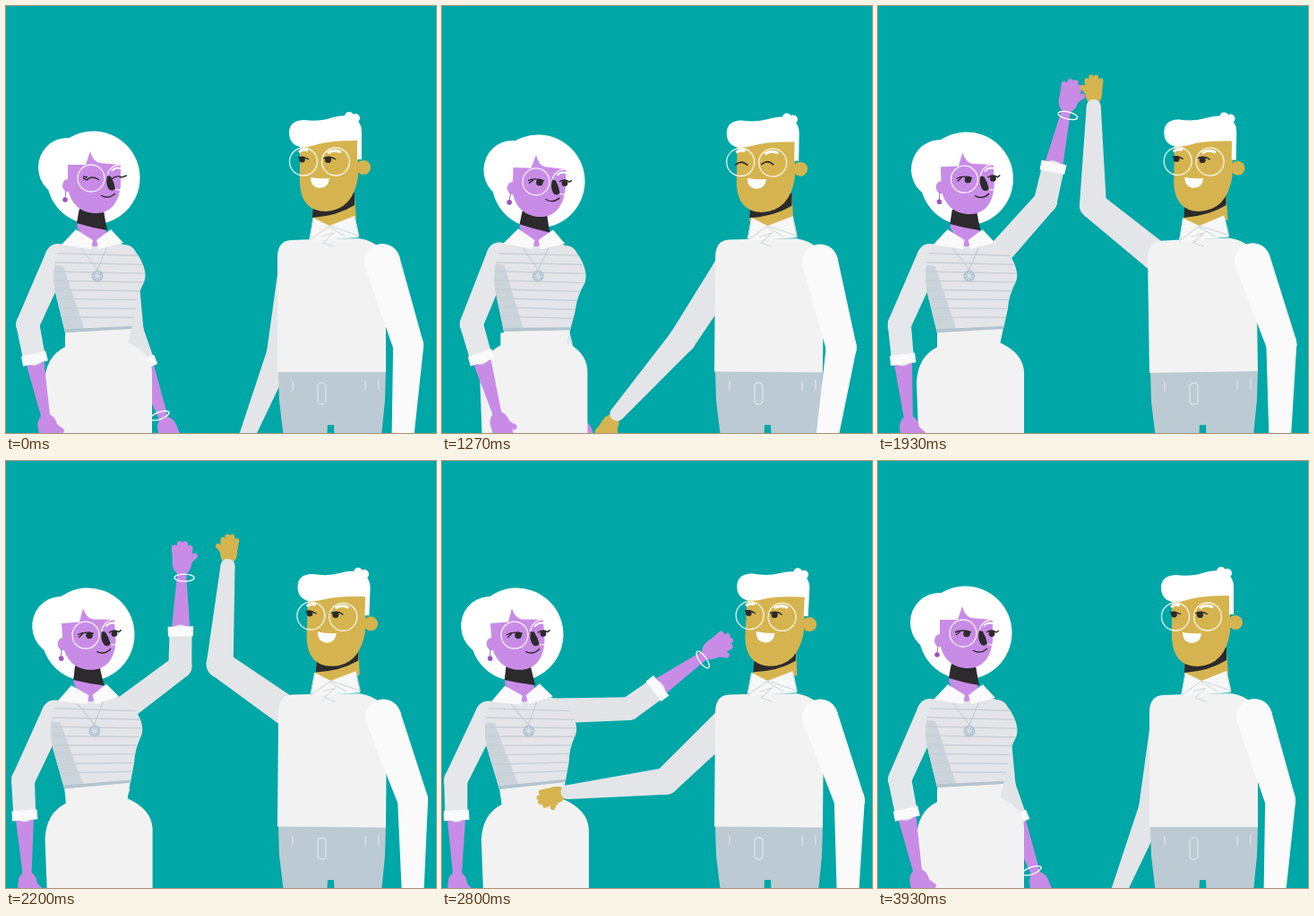
Write an HTML page with a canvas that moves like this. It is 480 px wide and 476 px high and loops after 3990 ms.

```html
<!DOCTYPE html>
<html lang="en">
<head>
<meta charset="utf-8">
<title>High five</title>
<style>
html, body { margin: 0; width: 100%; height: 100%; overflow: hidden; background: #00a7a7; }
canvas { display: block; }
</style>
</head>
<body>
<canvas id="stage" width="480" height="476"></canvas>
<script>
const ctx = document.getElementById('stage').getContext('2d');
const LOOP = 3990, STEP = 66.5, RAD = Math.PI / 180;
const TEAL = '#00a7a7', PURPLE = '#c88ce6', GOLD = '#d5b44f', WHITE = '#fff',
  DARK = '#2c2a2c', SHIRT = '#f2f2f2', SLEEVE = '#e4e5e8', STEEL = '#bccad3';

// time, head x, y, turn, torso x, turn, left upper arm, forearm, right upper arm, forearm, bend of the raised hand
const restW = [0, 0, 0, 0, 0, 114, 79, 84, 70, 0];
const woman = [
  [0, ...restW],
  [760, ...restW],
  [1265, 10, 4, 2, 3, 2, 112, 74, 96, 76, 0],
  [1596, -33, 6, -8, -4, -9, 115.6, 83, -44, -102, -13],
  [1870, 2, 1, -2, 0, 0, 114, 84, -49, -76, 0],
  [2195, -6, 2, -4, -1, -2, 115, 87.5, -37, -89, 0],
  [2795, -14, 2, -4, -2, -3, 116, 89, -1.5, -35, 0],
  [3350, ...restW],
  [LOOP, ...restW]
];
const restM = [0, 0, 0, 0, 0, 99, 112, 72.7, 93.5, 0];
const man = [
  [0, ...restM],
  [760, ...restM],
  [1265, 1, 1, 1, 1, .5, 123, 131.5, 76, 99, -10],
  [1596, 46, 1, 15, 4, 8.5, 234, 316, 73.5, 86, 23],
  [1870, 2, 0, 1, 0, -1, 220, 270, 71, 91, 0],
  [2195, 8, 0, 2, 0, .5, 215, 274.6, 70.3, 90, 0],
  [2795, 11, 0, 3, 1, .5, 136, 173.4, 70.5, 91, -10],
  [3350, ...restM],
  [LOOP, ...restM]
];

// monotone cubic through the keys
function sample(keys, t) {
  const i = keys.findIndex(k => k[0] > t) - 1, a = keys[i], b = keys[i + 1];
  const span = b[0] - a[0], u = (t - a[0]) / span, v = 1 - u;
  const rate = (j, c) => (keys[j + 1][c] - keys[j][c]) / (keys[j + 1][0] - keys[j][0]);
  const slope = (j, c) => {
    if (!j || j === keys.length - 1) return 0;
    const p = rate(j - 1, c), q = rate(j, c);
    return p * q > 0 ? 2 * p * q / (p + q) : 0;
  };
  return a.map((_, c) => v * v * (1 + 2 * u) * a[c] + u * u * (3 - 2 * u) * b[c]
    + span * u * v * (v * slope(i, c) - u * slope(i + 1, c))).slice(1);
}

function fill(path, color) {
  ctx.fillStyle = color;
  ctx.fill(new Path2D(path));
}
function line(path, color, width) {
  ctx.strokeStyle = color;
  ctx.lineWidth = width;
  ctx.stroke(new Path2D(path));
}
function oval(x, y, rx, ry, color, stroke) {
  ctx.beginPath();
  ctx.ellipse(x, y, rx, ry, 0, 0, 7);
  if (stroke) {
    ctx.strokeStyle = color;
    ctx.lineWidth = stroke;
    ctx.stroke();
  } else {
    ctx.fillStyle = color;
    ctx.fill();
  }
}
const dot = (x, y, r, color) => oval(x, y, r, r, color);
const ring = (x, y, r) => oval(x, y, r, r, '#ffffffdd', 1.3);

function turned(dx, dy, deg, px, py, draw) {
  ctx.save();
  ctx.translate(px + dx, py + dy);
  ctx.rotate(deg * RAD);
  ctx.translate(-px, -py);
  draw();
  ctx.restore();
}
function spin([x, y], dx, deg, px, py) {
  const c = Math.cos(deg * RAD), s = Math.sin(deg * RAD);
  x -= px; y -= py;
  return [px + dx + x * c - y * s, py + x * s + y * c];
}
const along = ([x, y], deg, d) => [x + d * Math.cos(deg * RAD), y + d * Math.sin(deg * RAD)];

function limb(a, deg, length, ra, rb, color) {
  const b = along(a, deg, length);
  dot(...a, ra, color);
  dot(...b, rb, color);
  const corners = [along(a, deg - 90, ra), along(b, deg - 90, rb),
    along(b, deg + 90, rb), along(a, deg + 90, ra)];
  fill('M' + corners.join('L') + 'Z', color);
  return b;
}

function hand([x, y], deg, size, thumb, color) {
  ctx.save();
  ctx.translate(x, y);
  ctx.rotate(deg * RAD);
  ctx.scale(size, size * thumb);
  ctx.lineCap = 'round';
  oval(11, 0, 13, 10, color);
  [-8, -2.5, 3, 8].forEach((f, i) => line(`M10 ${f * .8}L${[26, 30, 30, 26][i]} ${f}`, color, 6));
  line('M6 4Q14 8 18 13', color, 6);
  ctx.restore();
}

function womanArm(shoulder, upper, fore, bend, color, thumb, bracelet) {
  const elbow = limb(shoulder, upper, 83, 14, 13, color);
  const wrist = limb(along(elbow, fore, 38), fore, 66, 10.5, 5, PURPLE);
  hand(wrist, fore + bend, 1.08, thumb, PURPLE);
  limb(elbow, fore, 34, 13, 12.5, color);
  ctx.save();
  ctx.translate(...elbow);
  ctx.rotate(fore * RAD);
  fill('M33 -14L44 -14.5L45 14L34 14Z', '#fafafa');
  if (bracelet) oval(99, 3, 4, 11, WHITE, 1.3);
  ctx.restore();
}

function drawNeck(head, torso, rise, px, py, draw) {
  const [hx, hy, hr] = head, [tx, tr] = torso;
  const dx = (hx - 45 * Math.sin(hr * RAD) + tx + rise * Math.sin(tr * RAD)) / 2;
  turned(dx, hy / 2, (hr + tr) / 2, px, py, draw);
}

const BODICE = 'M62 266Q74 259 86 262L112 261Q136 264 147 277Q159 296 154 308Q146 323 145 338L140 360L66 364L54 315Q51 282 62 266Z';

function bodice(turn) {
  fill('M66 363L140 359L136 378L68 384Z', SHIRT);
  ctx.save();
  ctx.clip(new Path2D(BODICE));
  fill('M40 250H170V370H40Z', '#e4e5e8');
  fill('M50 288L64 290L88 362L60 368Z', '#cbd4da');
  // stripes stay nearly level at the bust and follow the belt lower down
  for (let y = 277; y < 356; y += 10) {
    const tilt = 57 * Math.tan((1.5 - turn) * RAD) * (363 - y) / 80;
    line(`M45 ${y - tilt}L159 ${y + tilt}`, '#c6cfd6', 1.4);
  }
  line('M60 363L146 359', '#b3c4cf', 5);
  ctx.restore();
  line('M84 270L102 294L113 268', '#bdcad2', 1);
  dot(102, 301, 6.5, '#b3c6d2');
  line('M102 296V306M97 301H107M99 298L105 304M105 298L99 304', '#dce5ea', 1);
  fill('M86 254L112 254L101 268L97 268Z', PURPLE);
  fill('M78 249L97 261L95 271L62 266Z', '#fafafa');
  fill('M117 249L101 261L104 271L131 264Z', '#fafafa');
}

function womanFace(shut) {
  oval(69, 200, 6, 7, PURPLE);
  line('M67 205L66 214', '#a468c4', 1);
  dot(66, 216, 2.8, '#9a57bb');
  fill('M69 177L89 177L94 162Q97 173 104 175L128 177L128 200C126 220 116 231 101 231C84 231 72 221 69 203Z', PURPLE);
  line('M106 211Q114 216 122 209', DARK, 1.4);
  line('M118 184Q122 179 129 181', WHITE, 2);
  ring(95, 192, 15);
  ring(127, 191, 14);
  fill('M113 189L117 190Q121 197 122 204Q117 208 114 203Q111 197 113 189Z', DARK);
  if (shut) {
    line('M86 192L90 194Q96 188 104 194M86 190L91 191M118 193Q123 188 129 191L135 189', DARK, 1.4);
  } else {
    dot(99, 192.5, 3.8, DARK);
    dot(127, 192.5, 3.4, DARK);
    line('M86 191Q94 187 104 191M87 194L92 190M121 191Q127 187 132 191L135 189', DARK, 1.4);
  }
}

function drawWoman(t) {
  const [hx, hy, hr, tx, tr, ul, fl, ur, fr, bend] = sample(woman, t);
  const shoulder = p => spin(p, tx, tr, 102, 363);
  const inHead = draw => turned(hx, hy, hr, 97, 192, draw);

  womanArm(shoulder([132, 280]), ur, fr, bend, '#e2e4e7', 1, true);
  // hips sway against the torso
  turned(-tr * .3, -tr * .9, 0, 0, 0, () =>
    fill('M66 366L66 380Q44 391 43 420L46 500H163V408Q162 386 134 374L138 364Z', SHIRT));
  womanArm(shoulder([58, 279]), ul, fl, 0, '#e6e7ea', -1);
  inHead(() => {
    dot(97.5, 191.5, 52, WHITE);
    oval(68, 180, 32, 33, WHITE);
  });
  drawNeck([hx, hy, hr], [tx, tr], 100, 97, 245, () => {
    fill('M81 228L79 246L86 258L98 268L112 258L110 230Z', PURPLE);
    fill('M82 226L79 242Q95 247 113 250L109 230Z', DARK);
  });
  turned(tx, 0, tr, 102, 363, () => bodice(tr));
  inHead(() => womanFace(t < 140));
}

function manShirt() {
  fill('M303 280Q303 262 318 261L344 260L394 259Q424 264 424 290V408H303Z', SHIRT);
  fill('M343 236L338 262L394 258L389 234L361 245Z', '#f7f7f7');
  line('M343 236L339 261L360 246L379 257M389 234L394 256L361 245M352 257L366 253L354 264L366 268', '#ccd5da', 1);
}

function manHead(shut) {
  dot(399, 180, 8, GOLD);
  fill('M328 155L328 198Q330 229 357 229Q388 227 393 190V148H340Z', GOLD);
  dot(383, 123, 5, WHITE);
  dot(390, 125, 5, WHITE);
  fill('M328 157Q316 154 316 141Q316 128 332 127Q350 129 362 125Q378 120 386 124Q397 128 397 140V171H392V150Q360 150 345 155Q335 158 328 157Z', WHITE);
  line('M359 164Q366 159 374 163M327 163Q331 159 337 161', WHITE, 3);
  ring(332, 173.5, 15.5);
  ring(368, 173.5, 15.5);
  if (shut) {
    line('M326 177Q333 170 340 177M355 176Q362 169 369 176', DARK, 1.6);
  } else {
    dot(330.5, 171, 3.4, DARK);
    dot(359.5, 171.5, 3.6, DARK);
    line('M326 169Q332 167 338 171M354 170Q361 166 368 171', DARK, 1.4);
  }
  fill('M340 191Q350 193 361 192Q360 203 350 203Q340 202 340 191Z', WHITE);
}

function drawMan(t) {
  const [hx, hy, hr, tx, tr, ul, fl, ur, fr, bend] = sample(man, t);
  const shoulder = p => spin(p, tx, tr, 363, 408);

  const elbow = limb(shoulder([322, 286]), ul, 103, 17, 15, SLEEVE);
  const wrist = along(elbow, fl, 114);
  hand(wrist, fl + bend, .95, -1, GOLD);
  limb(elbow, fl, 110, 15, 8, SLEEVE);

  // the waist tilts while the legs stay upright
  ctx.save();
  ctx.translate(363 + tx, 408);
  ctx.transform(1, Math.tan(tr * RAD), 0, 1, 0, 0);
  ctx.translate(-363, -408);
  fill('M304 406H424L423 440L418 490H367L366 467H359L358 490H311L305 440Z', STEEL);
  line('M348 424Q348 420 352.500 420Q357 420 357 424V440Q357 444 352.500 444Q348 444 348 440ZM320 418V429M401 418V429M416 416V428', '#e6ecef', 1);
  ctx.restore();

  drawNeck([hx, hy, hr], [tx, tr], 163, 366, 232, () => {
    fill('M343 215L342 240L361 250L391 238L389 210Z', GOLD);
    fill('M343 215L342 236Q370 234 389 222V208Z', DARK);
  });
  turned(tx, 0, tr, 363, 408, manShirt);
  const outer = limb(shoulder([420, 285]), ur, 98, 20, 17, '#fafafa');
  limb(outer, fr, 110, 17, 12, '#fafafa');
  turned(hx, hy, hr, 360, 185, () => manHead(t > 1190 && t < 1340));
}

function frame(now) {
  const t = Math.floor((now % LOOP + 4) / STEP) * STEP % LOOP;
  ctx.fillStyle = TEAL;
  ctx.fillRect(0, 0, 480, 476);
  drawWoman(t);
  drawMan(t);
  requestAnimationFrame(frame);
}
requestAnimationFrame(frame);
</script>
</body>
</html>
```
